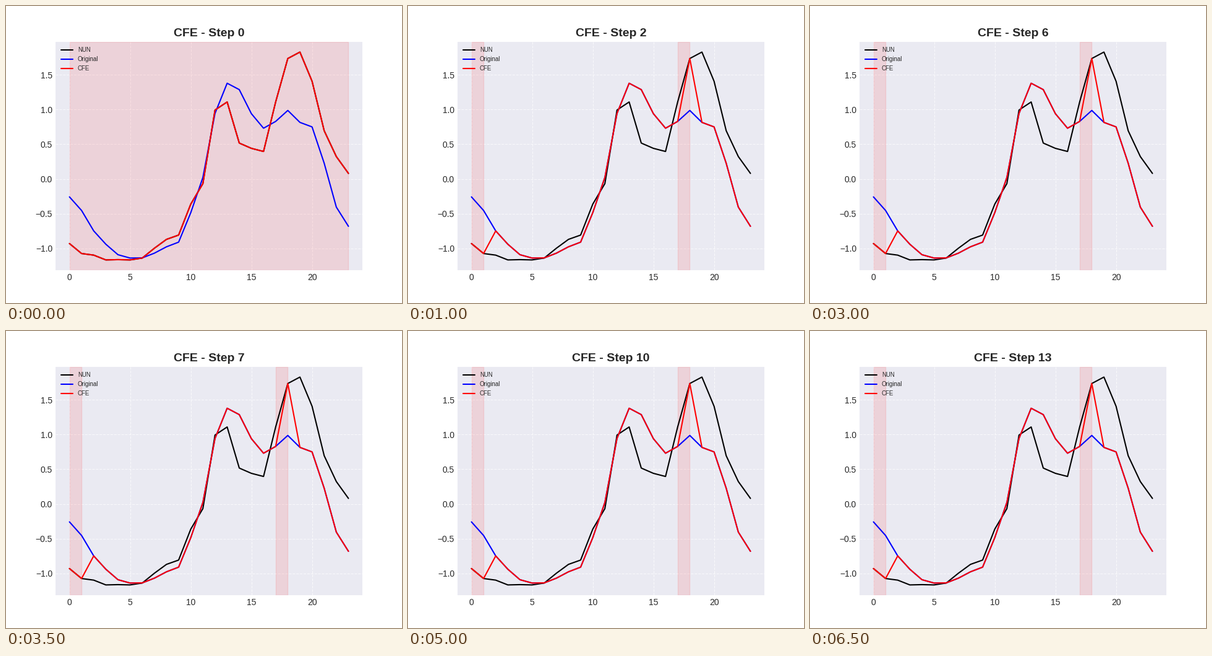
Recreate the animation shown at these times as a matplotlib script. Size 640 by 480 pixels, loop 7000 ms.

```python
import numpy as np
import matplotlib.pyplot as plt
from matplotlib.animation import FuncAnimation

STEPS = 14
STEP_MS = 500
INK = ".15"

plt.rcParams.update({
    "font.family": "Liberation Sans",
    "text.color": INK,
    "xtick.color": INK,
    "ytick.color": INK,
    "xtick.major.size": 0,
    "ytick.major.size": 0,
    "axes.facecolor": "#EAEAF2",
    "axes.edgecolor": "white",
    "axes.linewidth": 0,
    "axes.axisbelow": True,
    "grid.color": "white",
    "lines.solid_capstyle": "round",
})

neighbour = np.array([
    -0.930, -1.074, -1.097, -1.166, -1.162, -1.166, -1.139, -0.998,
    -0.870, -0.808, -0.363, -0.067, 0.993, 1.109, 0.517, 0.441,
    0.396, 1.110, 1.735, 1.828, 1.408, 0.695, 0.323, 0.080])
base = np.array([
    -0.258, -0.454, -0.748, -0.940, -1.091, -1.139, -1.137, -1.069,
    -0.977, -0.910, -0.486, 0.022, 0.944, 1.379, 1.287, 0.940,
    0.731, 0.829, 0.987, 0.815, 0.750, 0.227, -0.405, -0.682])
hours = np.arange(len(base))

fig, ax = plt.subplots(figsize=(6.4, 4.8), dpi=100)
ax.set_xlim(-1.15, 24.15)
ax.set_ylim(-1.316, 1.978)
ax.grid(True, linestyle="--", alpha=0.7)

spans = [ax.axvspan(0, 1, color="red", alpha=0.1) for _ in range(2)]
ax.plot(hours, neighbour, color="black", label="NUN")
ax.plot(hours, base, color="blue", label="Original")
mix_line, = ax.plot(hours, base, color="red", label="CFE")
ax.legend(loc="upper left", fontsize=7, frameon=False)
title = ax.set_title("", fontsize=14, fontweight="bold")


def state(step):
    """Return the shaded ranges and the mask of swapped points."""
    if step == 0:
        return [(0, 23)], hours >= 0
    if step == 1:
        return [(0, 1), (17, 23)], (hours <= 1) | (hours >= 18)
    return [(0, 1), (17, 18)], (hours <= 1) | (hours == 18)


def draw(step):
    ranges, swapped = state(step)
    for i, span in enumerate(spans):
        span.set_visible(i < len(ranges))
        if i < len(ranges):
            left, right = ranges[i]
            span.set_x(left)
            span.set_width(right - left)
    mix_line.set_ydata(np.where(swapped, neighbour, base))
    title.set_text(f"CFE - Step {step}")
    return [*spans, mix_line, title]


anim = FuncAnimation(fig, draw, frames=STEPS, init_func=lambda: draw(0),
                     interval=STEP_MS, repeat=True, repeat_delay=0)
plt.show()
```
